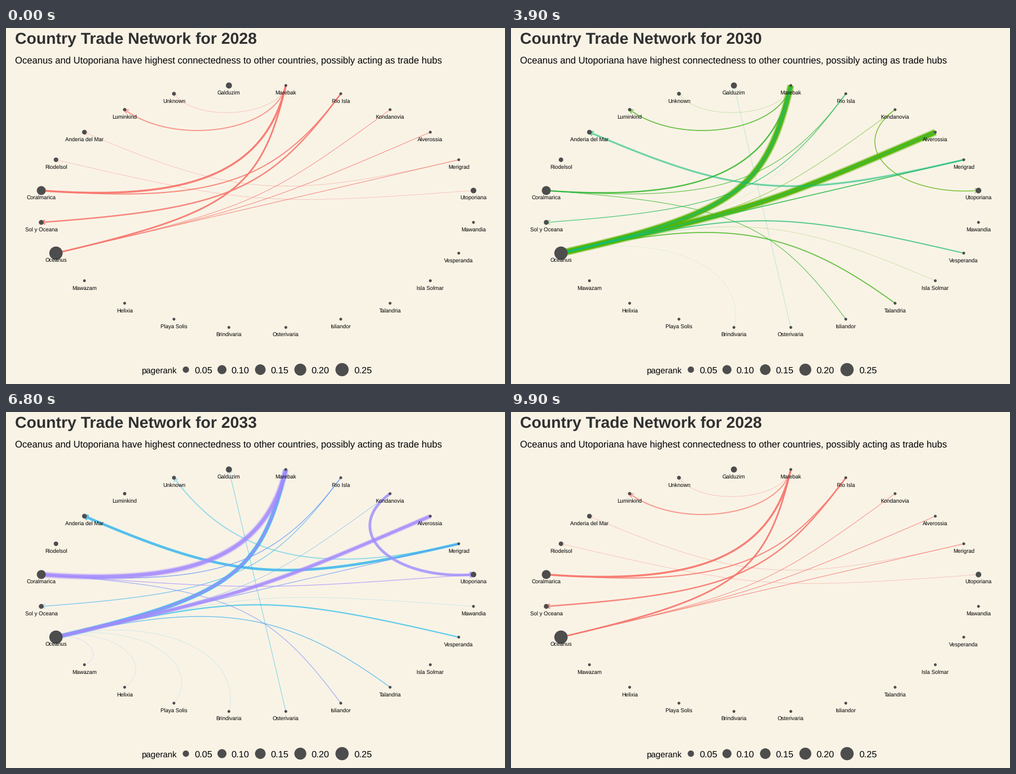
These frames come from a looping animation (885x632 px, 10000 ms). A matplotlib script:

```python
import math

import matplotlib.pyplot as plt
import numpy as np
from matplotlib.animation import FuncAnimation

W, H, DPI = 885, 632, 128
PT = 72 / DPI  # points per pixel
BG, NODE = "#F9F3E6", "#4D4D4D"
CENTER = np.array([445.8, 316.8])
RADIUS = np.array([386.6, 216.6])
LAYER_ALPHA = 0.5
STEPS = 7

plt.rcParams["font.family"] = "Liberation Sans"
plt.rcParams["text.hinting"] = "none"

# Counter-clockwise from the right: code, label, node radius
NODES = [
    ("Ut", "Utoporiana", 5), ("Me", "Merigrad", 2.5),
    ("Al", "Alverossia", 2.5), ("Ko", "Kondanovia", 2.5),
    ("Ri", "Rio Isla", 2.5), ("Mk", "Marebak", 2.5),
    ("Ga", "Galduzim", 5.4), ("Un", "Unknown", 3.4),
    ("Lu", "Luminkind", 3), ("An", "Anderia del Mar", 4.2),
    ("Rd", "Riodelsol", 4), ("Co", "Coralmarica", 7.9),
    ("So", "Sol y Oceana", 4.3), ("Oc", "Oceanus", 11.8),
    ("Mz", "Mawazam", 2.5), ("He", "Helixia", 2.5),
    ("Pl", "Playa Solis", 2.5), ("Br", "Brindivaria", 2.5),
    ("Os", "Osterivaria", 2.5), ("Is", "Isliandor", 2.5),
    ("Ta", "Talandria", 2.5), ("Im", "Isla Solmar", 2.5),
    ("Ve", "Vesperanda", 2.5), ("Mw", "Mawandia", 2.5),
]

# Per year: colour, first frame of the change that leaves it,
# and its trades as "from-to width layers"
YEARS = {
    2028: ("#F8766D", 8, """
        Mk-Un .7 1, Mk-Lu 1.9 2, Mk-Co 3.4 4, Mk-Oc 2.8 4, Ri-Co 1.9 3,
        Ri-So 2.5 3, Ko-Oc .9 3, Al-Oc 1 3, Me-Oc 1 3, Me-An .7 1, Ut-Rd .7 1"""),
    2029: ("#C49A00", 23, """
        Mk-Lu 1.8 4, Mk-Co 4 4, Mk-Oc 2.8 4, Ri-Co 1.3 3, Ri-So 1.2 3,
        Ko-Oc .9 2, Al-Oc .9 2, Me-Oc 1.9 4, Me-Un .9 2, Ko-Ut .9 2,
        Mw-Oc .8 1, Ve-Oc 1.9 4, Im-Oc .7 1"""),
    2030: ("#53B400", 38, """
        Mk-Un .7 1, Mk-Lu 1.6 4, Mk-Co 2.4 4, Mk-Oc 13 1, Mk-Oc 9 6,
        Al-Oc 13 1, Al-Oc 9 6, Ri-Co 1.1 3, Ri-So 1 2, Ko-Oc 1 2,
        Ko-Ut 1.4 4, Me-Oc 1.4 4, Me-An 1 2, Ve-Oc 1 3, Im-Oc .7 1,
        Ta-Oc 1.9 3, Is-Co 1 3"""),
    2031: ("#00C094", 51, """
        Mk-Lu .9 2, Mk-Co 1.8 3, Mk-Oc 4.2 4, Ri-Co .9 2, Ri-So 1.3 4,
        Ri-Oc .7 1, Al-Oc 1.9 4, Me-Oc 1.5 4, Me-An 4 2, Me-An 2.5 2,
        Ve-Oc 2.2 4, Ta-Oc 1 2, Is-Co 1 2, Br-Oc .7 1, Os-Ga .9 2"""),
    2032: ("#00B6EB", 65, """
        Me-Un 2 2, Me-An 4.6 5, Mk-Oc 8.5 1, Mk-Oc 6.5 5, Mk-Co 1 3,
        Ri-Co 1.3 3, Ri-So 1.3 3, Ko-Oc .8 2, Ko-Ut 3.6 1, Al-Oc .8 2,
        Me-Oc 1 3, Mw-Oc .8 1, Ve-Oc 2.2 4, Ta-Oc 1.3 4, Is-Co 1 2,
        Br-Oc .7 1, Pl-Oc .7 1, He-Oc .7 1, Os-Ga 1 3"""),
    2033: ("#A58AFF", 79, """
        Mk-Co 11 1, Mk-Co 7 5, Mk-Oc 4.6 4, Al-Oc 8.5 1, Al-Oc 5.5 5,
        Ko-Ut 5 4, Ri-Co 1.1 3, Ri-So .7 1, Ko-Oc .7 1, Me-An .9 3,
        Me-Oc .9 3, Ut-Co 1.2 4, Is-Co 1 3, Ta-Oc .8 1, Mz-Oc .8 1"""),
    2034: ("#FB61D7", 93, """
        Mk-Co 6 5, Mk-Oc 4.8 12, Al-Oc 5.5 5, Ko-Ut 5 12, Ri-Co 1.2 7,
        Ri-So .8 1, Me-An 1 4, Me-Oc 1 5, Ta-Oc .9 3, Ve-Oc .8 1"""),
}


def unit_pos(k):
    a = math.radians(7.5 + 15 * k)
    return np.array([math.cos(a), -math.sin(a)])


UNIT = {code: unit_pos(k) for k, (code, _, _) in enumerate(NODES)}


def arc(start, end):
    """Bezier bent towards the centre, ending in an open arrowhead."""
    a, b = UNIT[start], UNIT[end]
    pull = 1 - np.linalg.norm(a - b) / 2
    s = np.linspace(0, 1, 100)[:, None]
    pts = ((1 - s) ** 3 * a + 3 * s * (1 - s) ** 2 * a * pull
           + 3 * s ** 2 * (1 - s) * b * pull + s ** 3 * b)
    pts = CENTER + RADIUS * pts
    tip = pts[-1]
    back = math.atan2(*(pts[-3] - tip)[::-1])
    barbs = [tip + 7.6 * np.array([math.cos(back + d), math.sin(back + d)])
             for d in (-math.pi / 6, math.pi / 6)]
    return np.vstack([pts, [[np.nan, np.nan]], barbs[0], tip, barbs[1]])


fig = plt.figure(figsize=(W / DPI, H / DPI), dpi=DPI, facecolor=BG)
ax = fig.add_axes([0, 0, 1, 1])
ax.set_xlim(0, W)
ax.set_ylim(H, 0)
ax.axis("off")


def label(x, y, text, size, **kw):
    return ax.text(x, y, text, fontsize=size * PT, va="baseline", zorder=5, **kw)


def dot(x, y, r):
    ax.add_patch(plt.Circle((x, y), r, color=NODE, lw=0, zorder=4))


def build_edges(color, spec):
    edges = []
    for item in spec.split(","):
        pair, width, layers = item.split()
        pts = arc(*pair.split("-"))
        line, = ax.plot(pts[:, 0], pts[:, 1], color=color, lw=float(width) * PT,
                        solid_capstyle="butt", solid_joinstyle="round")
        edges.append((line, int(layers)))
    return edges


title = label(16, 28, "", 28.4, weight="bold", color="#303030")
label(16.5, 62.6, "Oceanus and Utoporiana have highest connectedness to other "
      "countries, possibly acting as trade hubs", 16.63, color="black")

for code, name, r in NODES:
    x, y = CENTER + RADIUS * UNIT[code]
    dot(x, y, r)
    label(x, y + 15.8, name, 9.6, ha="center", color="black")

label(240.5, 612.6, "pagerank", 15, color="black")
for x, r, tx, text in [(319, 5.6, 334, "0.05"), (383, 8, 399, "0.10"),
                       (451, 9.4, 469, "0.15"), (522, 10.6, 541, "0.20"),
                       (596, 11.7, 617, "0.25")]:
    dot(x, 606.5, r)
    label(tx, 613.2, text, 16.4, color="black")

EDGES = {year: build_edges(color, spec) for year, (color, _, spec) in YEARS.items()}
ORDER = list(YEARS)


def blend(i):
    """Current year, next year and progress between them."""
    for k, year in enumerate(ORDER):
        start = YEARS[year][1]
        if i < start + STEPS:
            t = max(0, (i - start + 1) / STEPS)
            return year, ORDER[(k + 1) % len(ORDER)], t
    return ORDER[0], ORDER[1], 0


def draw(i):
    now, after, t = blend(i)
    title.set_text(f"Country Trade Network for {after if t > 0.5 else now}")
    for year, edges in EDGES.items():
        fade = {now: 1 - t, after: t}.get(year, 0)
        for line, layers in edges:
            line.set_visible(fade > 0)
            line.set_alpha(1 - (1 - LAYER_ALPHA * fade) ** layers)
            line.set_zorder(2 if year == after else 1)
    return []


anim = FuncAnimation(fig, draw, frames=100, interval=100, repeat=True,
                     repeat_delay=0, init_func=lambda: draw(0))
plt.show()
```
